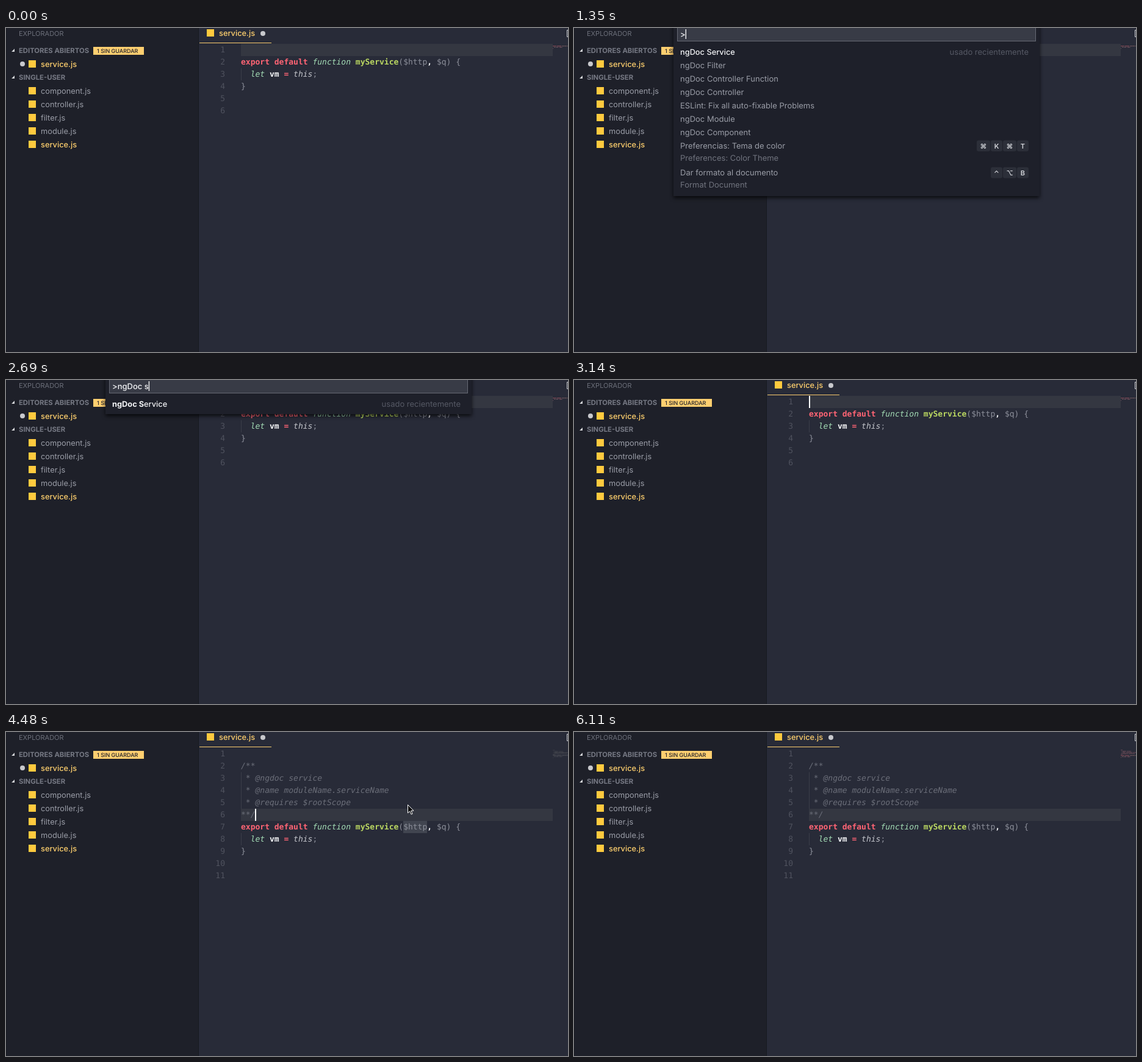
An HTML page that plays this animation: 921 px wide and 532 px high, repeating every 6.21 s.

```html
<!DOCTYPE html>
<html lang="es">
<head>
<meta charset="utf-8">
<title>ngDoc Service</title>
<style>
  html, body { margin: 0; width: 100%; height: 100%; overflow: hidden; background: #282b38; }
  svg { display: block; width: 921px; height: 532px; }
  text { font: 13px Inter, "Open Sans", sans-serif; fill: #9a9da7; white-space: pre; text-rendering: geometricPrecision; }
  #files text { font-size: 12.8px; }
  .code text { font: 13px "DejaVu Sans Mono", monospace; fill: #8d909b; }
  .code .num { fill: #4f525e; text-anchor: end; }
  .code .doc { fill: #6b6e79; font-style: italic; }
  .key { fill: #ff6474; font-weight: 700; }
  .type { fill: #a3dcb5; font-style: italic; }
  .name { fill: #bad761; font-weight: 700; }
  .self { fill: #c3c5cb; font-style: italic; }
  .strong { fill: #f4f5f7; font-weight: 700; }
  .small { font-size: 11px; fill: #6d707b; }
  .section { font-size: 11.3px; font-weight: 700; fill: #767984; }
  .open { fill: #ffd06e; font-weight: 500; }
  .badge { font-size: 9px; font-weight: 500; fill: #1e2029; }
  .input { fill: #f4f5f7; font-weight: 500; }
  .focus { fill: #f4f5f7; font-weight: 500; font-size: 12.8px; }
  .detail { fill: #70737e; }
  .hint { fill: #565965; text-anchor: end; }
  .hit { fill: #f4f5f7; font-weight: 700; }
  .detail .hit { fill: #c4c6cc; }
  .cap { font: 600 11px Inter, "DejaVu Sans", sans-serif; fill: #d4d6db; text-anchor: middle; }
  .panel { filter: drop-shadow(0 3px 3px rgba(0, 0, 0, .75)); }
</style>
</head>
<body>
<svg viewBox="0 0 921 532">
  <defs>
    <path id="beamLine" d="M-3-7Q0-7 0-5Q0-7 3-7M0-5V5M-3 7Q0 7 0 5Q0 7 3 7M-1.5 1H1.5"/>
  </defs>
  <rect width="921" height="532" fill="#282b38"/>
  <rect width="316" height="532" fill="#1e2029"/>
  <path d="M.5 0V532M315.5 0V532" stroke="#171920"/>

  <text class="small" x="21" y="13">EXPLORADOR</text>
  <path d="M14 34V39H9ZM14 78V83H9Z" fill="#d8d9dc"/>
  <text class="section" x="21" y="41">EDITORES ABIERTOS</text>
  <rect x="143" y="31" width="83" height="13" fill="#ffcf70"/>
  <text class="badge" x="149" y="41">1 SIN GUARDAR</text>
  <text class="section" x="21" y="85">SINGLE-USER</text>
  <g id="files"></g>
  <g fill="#c8c9cd"><circle cx="27" cy="59" r="4"/><circle cx="421" cy="9" r="4"/></g>
  <rect x="317" y="24" width="118" height="1" fill="#ffcf70"/>
  <path d="M921 3.5H919.5V14.5H921" fill="none" stroke="#d8d9dc"/>

  <g class="code">
    <rect id="line" x="385" width="511" height="20" fill="#343741"/>
    <rect data-on="4480-5660" x="651" y="146" width="39" height="20" fill="#414550"/>
    <g id="numbers"></g>
    <path data-on="3280-6210" d="M385.5 66V126" stroke="#3b3e49"/>
    <path class="shift" d="M385.5 66V86" stroke="#3b3e49"/>
    <g id="source">
      <g id="comment" data-on="3280-6210"></g>
      <g class="shift">
        <text x="385" y="60"><tspan class="key">export default</tspan> <tspan class="type">function</tspan> <tspan class="name">myService</tspan>($http<tspan class="strong">,</tspan> $q) {</text>
        <text x="385" y="80">  <tspan class="type">let</tspan> <tspan class="strong">vm</tspan> <tspan class="key">=</tspan> <tspan class="self">this</tspan>;</text>
        <text x="385" y="100">}</text>
      </g>
    </g>
    <use id="minimap" href="#source" stroke="#a8626e" stroke-width="3" stroke-opacity=".55"
      transform="translate(846.7 25.3) scale(.128 .085)"/>
    <g fill="#fff">
      <rect data-on="300-750 3140-3280" x="385" y="26" width="2" height="20"/>
      <rect data-on="3280-3730 4180-4780 5220-5660" x="408" y="126" width="2" height="20"/>
    </g>
    <g data-on="4630-5660">
      <rect x="652" y="119" width="182" height="28" fill="#3a3d49"/>
      <text x="657" y="137">(<tspan class="strong">parameter</tspan>) <tspan class="strong">$http: any</tspan></text>
    </g>
  </g>

  <g data-on="1350-3140">
    <rect id="panel" class="panel" x="163" y="-10" width="600" fill="#1e202a"/>
    <rect x="169.5" y="-5" width="587" height="26.5" fill="#383b46" stroke="#666974"/>
    <text id="input" class="input" x="174" y="15"></text>
    <rect id="caret" y="2" width="1.3" height="16" fill="#fff"/>
    <g id="list"></g>
  </g>

  <g id="mouse">
    <g id="beam" fill="none" stroke-linecap="round">
      <use href="#beamLine" stroke="#14161c" stroke-width="2.4"/>
      <use href="#beamLine" stroke="#fff" stroke-width="1.2"/>
    </g>
    <path id="arrow" d="M.5.5V14L3.7 11L6 16.2L8.1 15.3L5.9 10.2H10Z" fill="#08090b" stroke="#fff"/>
  </g>
</svg>
<script>
const LOOP = 6210, INSERTED = 3280;
const $ = id => document.getElementById(id);
const text = (x, y, cls, body) => `<text x="${x}" y="${y}" class="${cls}">${body}</text>`;

// Sidebar, tab and static code
const file = (x, y, name, cls = '') =>
  `<rect x="${x}" y="${y - 11}" width="12" height="12" fill="#ffca3e"/>` + text(x + 20, y, cls, name);
$('files').innerHTML = file(37, 64, 'service.js', 'open') + file(329, 13, 'service.js', 'open') +
  ['component', 'controller', 'filter', 'module', 'service']
    .map((name, i) => file(37, 108 + 22 * i, name + '.js', i === 4 ? 'open' : '')).join('');
$('comment').innerHTML = ['/**', ' * @ngdoc service', ' * @name moduleName.serviceName', ' * @requires $rootScope', '**/']
  .map((line, i) => text(385, 60 + 20 * i, 'doc', line)).join('');
$('numbers').innerHTML = Array.from({ length: 11 }, (_, i) =>
  `<g ${i > 5 ? `data-on="${INSERTED}-${LOOP}"` : ''}>${text(359, 40 + 20 * i, 'num', i + 1)}</g>`).join('');

// Command palette: rows are [label, detail, key caps, hint]
const [service, filter, fn, controller, module, component] =
  ['Service', 'Filter', 'Controller Function', 'Controller', 'Module', 'Component'].map(name => ['ngDoc ' + name]);
service[3] = 'usado recientemente';
const lists = {
  recent: [service, filter, fn, controller, ['ESLint: Fix all auto-fixable Problems'], module, component,
    ['Preferencias: Tema de color', 'Preferences: Color Theme', '⌘K⌘T'],
    ['Dar formato al documento', 'Format Document', '⌃⌥B']],
  mixed: [service, filter, fn, controller, module, component,
    ['Preferencias: Abrir Configuración de carpeta', 'Preferences: Open Folder Settings'],
    ['Preferencias: Abrir configuración de usuario', 'Preferences: Open User Settings', '⌘,'],
    ['Alternando omitir este archivo', 'Toggle Skipping this File', '', 'otros comandos']],
  docs: [service, filter, fn, controller, module, component],
  single: [service]
};
const queries = [
  [1350, '', 'recent'], [1790, 'n', 'recent'], [1940, 'ng', 'mixed'], [2240, 'ngD', 'docs'],
  [2390, 'ngDoc', 'docs'], [2690, 'ngDoc s', 'single'], [2990, 'ngDoc ser', 'single']
];

function mark(label, query) {
  const at = label.toLowerCase().indexOf(query.toLowerCase());
  if (!query || at < 0) return label;
  const end = at + query.length;
  return `${label.slice(0, at)}<tspan class="hit">${label.slice(at, end)}</tspan>${label.slice(end)}`;
}

function keyCaps(keys, top) {
  let right = 745;
  return [...keys].reverse().map(key => {
    const width = '⌘⌥'.includes(key) ? 22 : key === ',' ? 15 : 19;
    const x = right - width;
    right = x - 1;
    return `<rect x="${x}" y="${top + 1.5}" width="${width}" height="18" rx="3" fill="#2c2f39"/>` +
      text(x + width / 2, top + 15, 'cap', key);
  }).join('');
}

function showPalette([, query, listName]) {
  let top = 29, out = '';
  lists[listName].forEach(([label, detail, keys = '', hint], i) => {
    if (i && hint) out += `<path d="M163 ${top - .5}H763" stroke="#30333e"/>`;
    const base = top + (i && hint ? 16 : 15);
    out += text(174, base, i ? '' : 'focus', mark(label, query)) + keyCaps(keys, top);
    if (detail) out += text(174, base + 20, 'detail', mark(detail, query));
    if (hint) out += text(745, base, 'hint', hint);
    top += detail ? 44 : 22;
  });
  $('list').innerHTML = out;
  $('panel').setAttribute('height', top + 15);
  $('input').textContent = '>' + query;
  $('caret').setAttribute('x', 174 + $('input').getComputedTextLength());
}

const pointer = [
  [3730, 'beam', 830, 359], [3880, 'beam', 779, 280], [4030, 'beam', 677, 149],
  [4480, 'arrow', 658, 119], [5520, 'arrow', 901, 474], [5660, 'arrow', 912, 493],
  [5810, 'arrow', 912, 526], [5960, '', 0, 0]
];

const timed = [...document.querySelectorAll('[data-on]')].map(node =>
  [node, node.dataset.on.split(' ').map(span => span.split('-').map(Number))]);
const shifted = document.querySelectorAll('.shift');
const latest = (steps, t) => steps.filter(step => step[0] <= t).pop();
const show = (node, on) => { node.style.display = on ? '' : 'none'; };
let shownQuery;

function draw() {
  const t = performance.now() % LOOP, inserted = t >= INSERTED;
  for (const [node, spans] of timed) show(node, spans.some(([from, to]) => t >= from && t < to));
  for (const node of shifted) node.setAttribute('transform', `translate(0 ${inserted ? 100 : 0})`);
  $('line').setAttribute('y', inserted ? 126 : 26);

  const pale = inserted && t < 6110;
  $('minimap').style.filter = pale ? 'grayscale(1)' : '';
  $('minimap').style.opacity = pale && t < 5660 ? .75 : 1;

  const query = latest(queries, t);
  if (query && query !== shownQuery && t < 3140) showPalette(shownQuery = query);

  const [, shape, x, y] = latest(pointer, t) || [0, '', 0, 0];
  $('mouse').setAttribute('transform', `translate(${x} ${y})`);
  show($('beam'), shape === 'beam');
  show($('arrow'), shape === 'arrow');
  requestAnimationFrame(draw);
}
draw();
</script>
</body>
</html>
```
